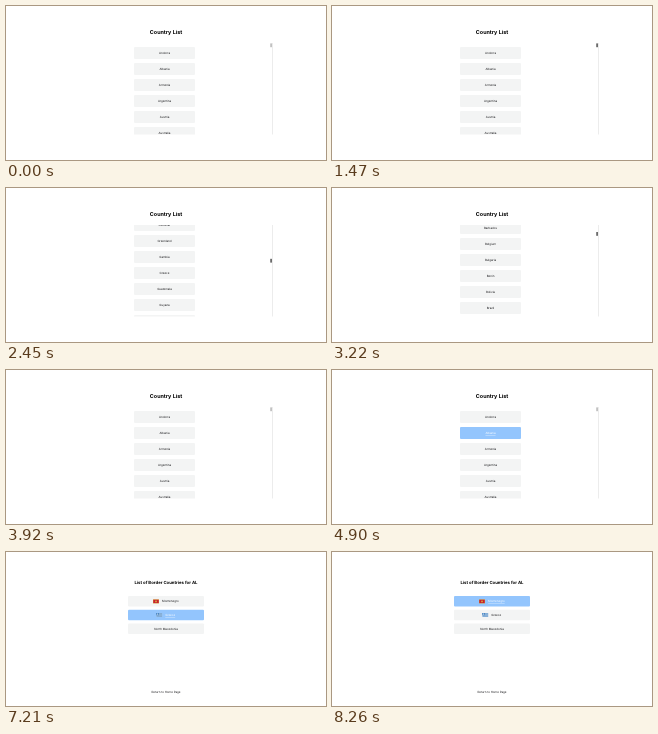
Animation, 320 px wide and 154 px high, one loop 8750 ms. Source, as an HTML page:

```html
<!DOCTYPE html>
<html lang="en">
<head>
<meta charset="utf-8">
<title>Country List</title>
<style>
  html, body { margin: 0; height: 100%; overflow: hidden; background: #fff; }
  svg { display: block; width: 100vw; height: 100vh; }
  text {
    font: 2.9px Inter, Arial, sans-serif;
    text-anchor: middle;
    text-rendering: geometricPrecision;
    fill: #18181b;
  }
  text.title { font-size: 5.4px; font-weight: 700; fill: #000; }
  text.heading { font-size: 4.27px; font-weight: 700; fill: #000; }
  text.loading { font-weight: 600; fill: #000; }
  .item rect.box { fill: #f3f4f4; }
  .item.hover rect.box { fill: #93c5fd; }
  .item.hover text { fill: #fff; }
  .item.underline text { text-decoration: underline; }
</style>
</head>
<body>
<svg viewBox="0 0 320 154">
  <defs><clipPath id="view"><rect x="120" y="37" width="80" height="91.5"/></clipPath></defs>
  <g id="listPage">
    <text class="title" x="160" y="28">Country List</text>
    <g clip-path="url(#view)"><g id="list"></g></g>
    <rect x="266" y="37" width=".7" height="91.5" fill="#e4e4e4"/>
    <rect id="thumb" x="264.2" width="1.8" height="3.8"/>
  </g>
  <g id="borderPage">
    <text class="heading" x="160" y="31.7">List of Border Countries for AL</text>
    <g id="loader">
      <text class="loading" x="160" y="54.8">Loading</text>
      <circle id="spinner" cx="159.8" cy="61.2" r="2.75" fill="none" stroke="#18181b" stroke-width=".9"
        pathLength="4" stroke-dasharray="3 1"/>
    </g>
    <g id="borders"></g>
    <text id="back" x="160">Return to Home Page</text>
  </g>
</svg>
<script>
const LOOP = 8750, STEP = 70, MAX_SCROLL = 682;
const $ = id => document.getElementById(id);
const countries = ('Andorra,Albania,Armenia,Argentina,Austria,Australia,Åland Islands,Bosnia and Herzegovina,' +
  'Barbados,Belgium,Bulgaria,Benin,Bolivia,Brazil,Bahamas,Botswana,Belarus,Belize,Canada,Switzerland,' +
  'Chile,China,Colombia,Costa Rica,Cuba,Cyprus,Czechia,Germany,Denmark,Dominican Republic,Ecuador,' +
  'Estonia,Egypt,Spain,Finland,Faroe Islands,France,Gabon,United Kingdom,Grenada,Georgia,Guernsey,' +
  'Gibraltar,Greenland,Gambia,Greece,Guatemala,Guyana,Hong Kong,Honduras').split(',');

function add(parent, tag, attrs, text = '') {
  const el = document.createElementNS('http://www.w3.org/2000/svg', tag);
  for (const key in attrs) el.setAttribute(key, attrs[key]);
  el.textContent = text;
  return parent.appendChild(el);
}
const rect = (parent, x, y, width, height, fill) => add(parent, 'rect', {x, y, width, height, fill});

function addItem(parent, x, y, width, height, name, textX) {
  const item = add(parent, 'g', {class: 'item'});
  add(item, 'rect', {class: 'box', x, y, width, height, rx: 1});
  add(item, 'text', {x: textX, y: y + height / 2 + 1.05}, name);
  return item;
}

const rows = countries.map((name, i) => addItem($('list'), 128, 41 + 16 * i, 61, 12, name, 158.5));
const borders = [['Montenegro', 164.4], ['Greece', 164.2], ['North Macedonia', 160]]
  .map(([name, x], i) => addItem($('borders'), 122, 44 + 13.7 * i, 76, 10.5, name, x));

// Flags
const [montenegro, greece] = borders;
rect(montenegro, 147, 47.4, 6, 4, '#d4af3a');
rect(montenegro, 147.3, 47.7, 5.4, 3.4, '#c8202f');
add(montenegro, 'circle', {cx: 150, cy: 49.4, r: .9, fill: '#d4af3a'});
rect(greece, 150.4, 61, 5.8, 4, '#fff');
for (let i = 0; i < 5; i++) rect(greece, 150.4, 61 + i * 8 / 9, 5.8, 4 / 9, '#0d5eaf');
rect(greece, 150.4, 61, 2.2, 2.2, '#0d5eaf');
rect(greece, 151.28, 61, .44, 2.2, '#fff');
rect(greece, 150.4, 61.88, 2.2, .44, '#fff');

const show = (el, on) => el.style.display = on ? '' : 'none';
const within = (t, from, to) => t >= from && t < to;
function mark(item, hover, underline) {
  item.classList.toggle('hover', hover);
  item.classList.toggle('underline', underline);
}
const ramp = (t, from, to) => Math.min(1, Math.max(0, (t - from) / (to - from)));

function scrollAt(t) {
  const down = ramp(t, 1960, 2450), up = ramp(t, 2660, 3500);
  // the release only starts once the hold at the bottom is over
  if (t >= 2730) return MAX_SCROLL * (1 - up) ** 1.474;
  return MAX_SCROLL * down * down * (3 - 2 * down);
}

function draw(t) {
  const onList = t < 5460, loaded = t >= 7210;
  show($('listPage'), onList);
  show($('borderPage'), !onList);
  show($('loader'), !loaded);
  show($('borders'), loaded);

  const scroll = scrollAt(t);
  $('list').setAttribute('transform', `translate(0 ${-scroll})`);
  $('thumb').setAttribute('y', 37.4 + scroll * 88 / 1796);
  $('thumb').setAttribute('fill', within(t, 1470, 3920) ? '#6b6b6b' : '#c1c1c1');
  mark(rows[0], within(t, 4340, 4620), false);
  mark(rows[1], t >= 4690, t >= 4900);

  $('spinner').setAttribute('transform', `rotate(${(t - 5460) * .36 - 45} 159.8 61.2)`);
  $('back').setAttribute('y', loaded ? 140.8 : 93);
  mark(greece, t < 8120, t < 8050);
  mark(montenegro, t >= 8190, t >= 8260);
}

const start = performance.now();
function tick() {
  const t = (performance.now() - start) % LOOP;
  draw(Math.floor(t / STEP) * STEP);
  requestAnimationFrame(tick);
}
tick();
</script>
</body>
</html>
```
